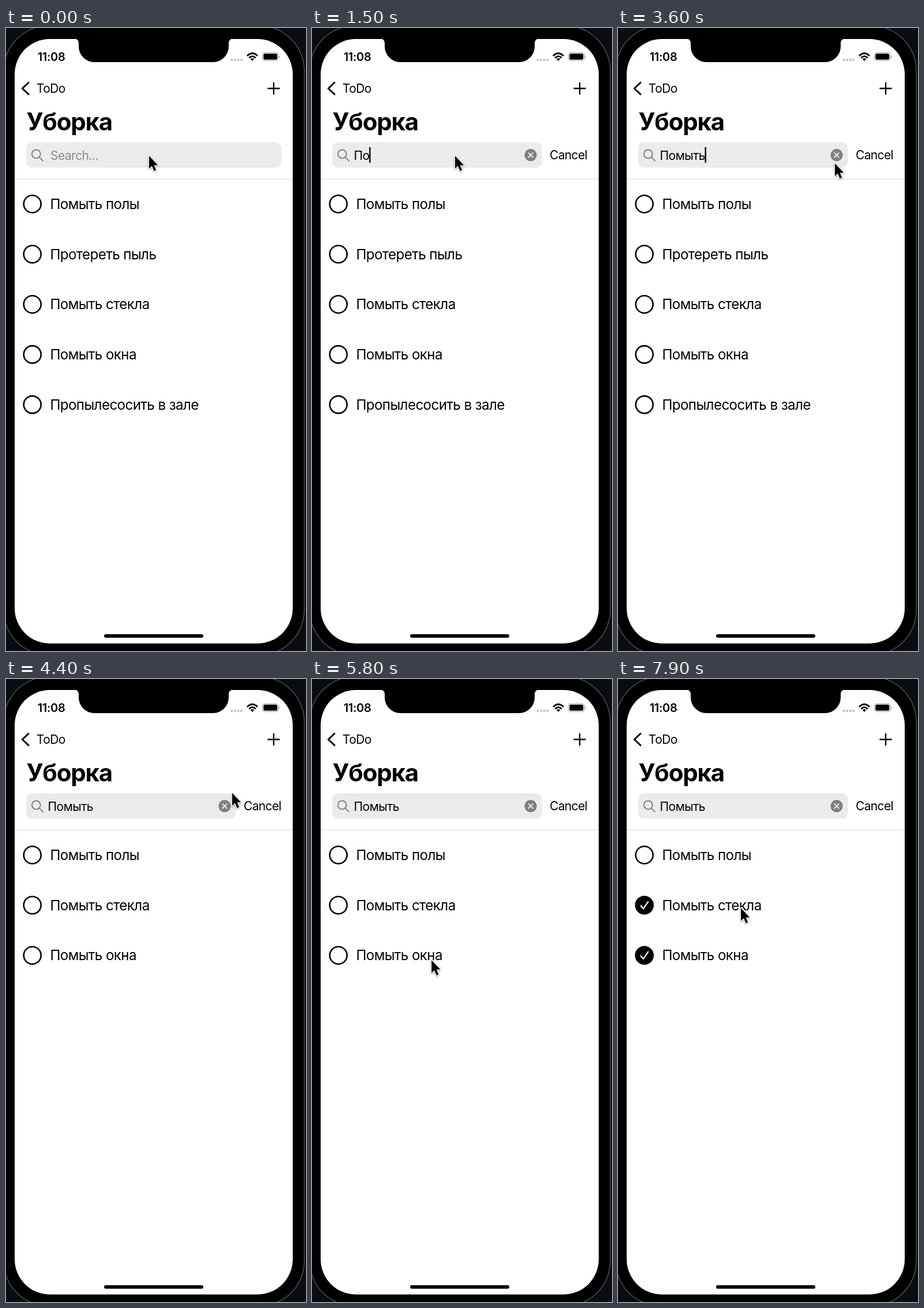
Recreate the animation shown at these times as an HTML page. Size 520 by 1077 pixels, loop 8 s.

```html
<!DOCTYPE html>
<html lang="ru">
<head>
<meta charset="utf-8">
<title>ToDo</title>
<style>
html, body { margin: 0; width: 100%; height: 100%; overflow: hidden; background: #0b0c12; }
svg { display: block; }
text { font: 21px Inter, sans-serif; letter-spacing: -.53px; font-optical-sizing: none; }
.row text { font-size: 24.2px; letter-spacing: -.62px; }
.title { font-size: 42px; font-weight: 700; letter-spacing: -1.2px; }
.clock { font-size: 20px; font-weight: 600; letter-spacing: -.3px; }
#cancel { letter-spacing: -.65px; }
.line { fill: none; stroke: #000; stroke-linecap: round; stroke-linejoin: round; }
</style>
</head>
<body>
<svg width="520" height="1077" viewBox="0 0 520 1077">
  <rect x="-4" y="-4" width="521" height="1088" rx="78" stroke="#444447" stroke-width="1.8"/>
  <rect x="15" y="19" width="482" height="1045" rx="61" fill="#fff"/>
  <path d="M118 18A8 8 0 0 1 126 27V32A27 27 0 0 0 153 59H359A27 27 0 0 0 386 32V27A8 8 0 0 1 394 18Z"/>
  <rect x="170" y="1048" width="172" height="6" rx="3"/>

  <text class="clock" x="54.7" y="57">11:08</text>
  <path class="line" d="M391.3 55H409" stroke-width="4.4" stroke-dasharray="0 5.6" style="stroke:#c6c6c8"/>
  <path d="M418 48.2Q427 39.4 436 48.2M421.3 51.7Q427 46.2 432.7 51.7" fill="none" stroke="#000" stroke-width="2.7"/>
  <path d="M423.7 53.6Q427 50.8 430.3 53.6L427 57Z"/>
  <rect x="444.5" y="42.5" width="27.5" height="14" rx="4" fill="none" stroke="#a4a4a6" stroke-width="1.2"/>
  <rect x="446.3" y="44.3" width="23.9" height="10.4" rx="2.5"/>
  <path d="M473.4 47.2Q476.4 49.5 473.4 51.8Z" fill="#a4a4a6"/>

  <path class="line" d="M39 94.3L28.3 104.5L39 114.7" stroke-width="3"/>
  <text x="52.8" y="112">ToDo</text>
  <path class="line" d="M454.3 104.5H473.7M464 94.8V114.2" stroke-width="2.3"/>
  <text class="title" x="35.4" y="177">Уборка</text>

  <rect id="field" x="35" y="197.5" height="44" rx="10" fill="#ebebec"/>
  <g fill="none" stroke="#828286" stroke-width="2" stroke-linecap="round">
    <circle cx="52.3" cy="217.8" r="7.4"/><path d="M57.8 223.4L64 229.6"/>
  </g>
  <text id="hint" x="77" y="227.5" fill="#8c8c90">Search...</text>
  <text id="query" x="72.5" y="227.5"></text>
  <rect id="caret" y="206" width="2.4" height="27"/>
  <g id="clear">
    <circle cx="379" cy="219.7" r="10.6" fill="#808084"/>
    <path d="M375.2 215.9l7.6 7.6m0-7.6l-7.6 7.6" stroke="#ebebec" stroke-width="1.9" stroke-linecap="round"/>
  </g>
  <svg width="497" height="1077"><text id="cancel" y="226.5">Cancel</text></svg>
  <path d="M15 261H497" stroke="#d6d6d8" stroke-width="1.2"/>

  <g id="list"></g>
  <path id="mouse" d="M0 0V22L5 17.6L8.6 26.2L12.2 24.6L8.6 16.4L15.2 16Z" stroke="#fff" stroke-width="2.4"
    stroke-linejoin="round" paint-order="stroke" style="filter:drop-shadow(0 1.5px 1.5px #0006)"/>
</svg>

<script>
const LOOP = 8000, STEP = 100;
const $ = id => document.getElementById(id);
const tasks = ['Помыть полы', 'Протереть пыль', 'Помыть стекла', 'Помыть окна', 'Пропылесосить в зале'];
const checkedAt = { 'Помыть окна': 6500, 'Помыть стекла': 7800 };
const searchWord = 'Помыть', tapAt = 100, submitAt = 3800;
const keyTimes = [...searchWord].map((_, i) => Math.min(1100 + 350 * i, 2600));

const restPoint = { x: 248, y: 221 };
const moves = [
  { from: 3000, to: 3600, x: 376, y: 234 },
  { from: 4200, to: 4400, x: 392, y: 197 },
  { from: 4400, to: 4800, x: 300, y: 775 },
  { from: 4800, to: 5400, x: 218, y: 495 },
  { from: 5700, to: 6000, x: 201, y: 481 },
  { from: 6600, to: 6900, x: 213, y: 396 },
];

const progress = (t, from, to) => Math.min(1, Math.max(0, (t - from) / (to - from)));
const smooth = p => p * p * (3 - 2 * p);
const easeOut = p => 1 - (1 - p) ** 2.5;

function mouseAt(t) {
  let { x, y } = restPoint;
  for (const move of moves) {
    const p = easeOut(progress(t, move.from, move.to));
    x += (move.x - x) * p;
    y += (move.y - y) * p;
  }
  return [x, y];
}

// Solid for half a second after each input, then a fading blink every second
function caretAlpha(t) {
  if (t >= submitAt) return 0;
  const lastInput = Math.max(tapAt, ...keyTimes.filter(k => k <= t));
  return 1 - progress((t - lastInput) % 1000, 500, 800);
}

$('list').innerHTML = tasks.map(name => `<g class="row">
  <circle cx="45.7" r="15" stroke="#000" stroke-width="2.6"/>
  <path class="line" d="M39.5 1L43.9 6.2L52.2 -6" style="stroke:#fff" stroke-width="2.2"/>
  <text x="76.4" y="8.5">${name}</text></g>`).join('');
const rows = [...$('list').children];

function draw(t) {
  const open = smooth(progress(t, 0, 400));
  $('field').setAttribute('width', 442.5 - 79 * open);
  $('cancel').setAttribute('x', 491 - 79 * open);
  $('cancel').style.opacity = open;

  const typed = searchWord.slice(0, keyTimes.filter(k => k <= t).length);
  $('query').textContent = typed;
  $('hint').style.opacity = typed ? 0 : 1;
  $('clear').style.opacity = progress(t, 1000, 1200);
  $('caret').setAttribute('x', 72 + (typed ? $('query').getComputedTextLength() : 0));
  $('caret').style.opacity = open * caretAlpha(t);

  let place = 0;
  rows.forEach((row, i) => {
    const shown = t < submitAt || tasks[i].startsWith(searchWord);
    const done = t >= checkedAt[tasks[i]];
    row.style.display = shown ? '' : 'none';
    row.children[0].setAttribute('fill', done ? '#000' : '#fff');
    row.children[1].style.opacity = done ? 1 : 0;
    if (shown) row.setAttribute('transform', `translate(0 ${304.3 + 86.7 * place++})`);
  });
  $('mouse').setAttribute('transform', `translate(${mouseAt(t)})`);
}

function tick() {
  draw(Math.floor(performance.now() % LOOP / STEP) * STEP);
  requestAnimationFrame(tick);
}
tick();
</script>
</body>
</html>
```
